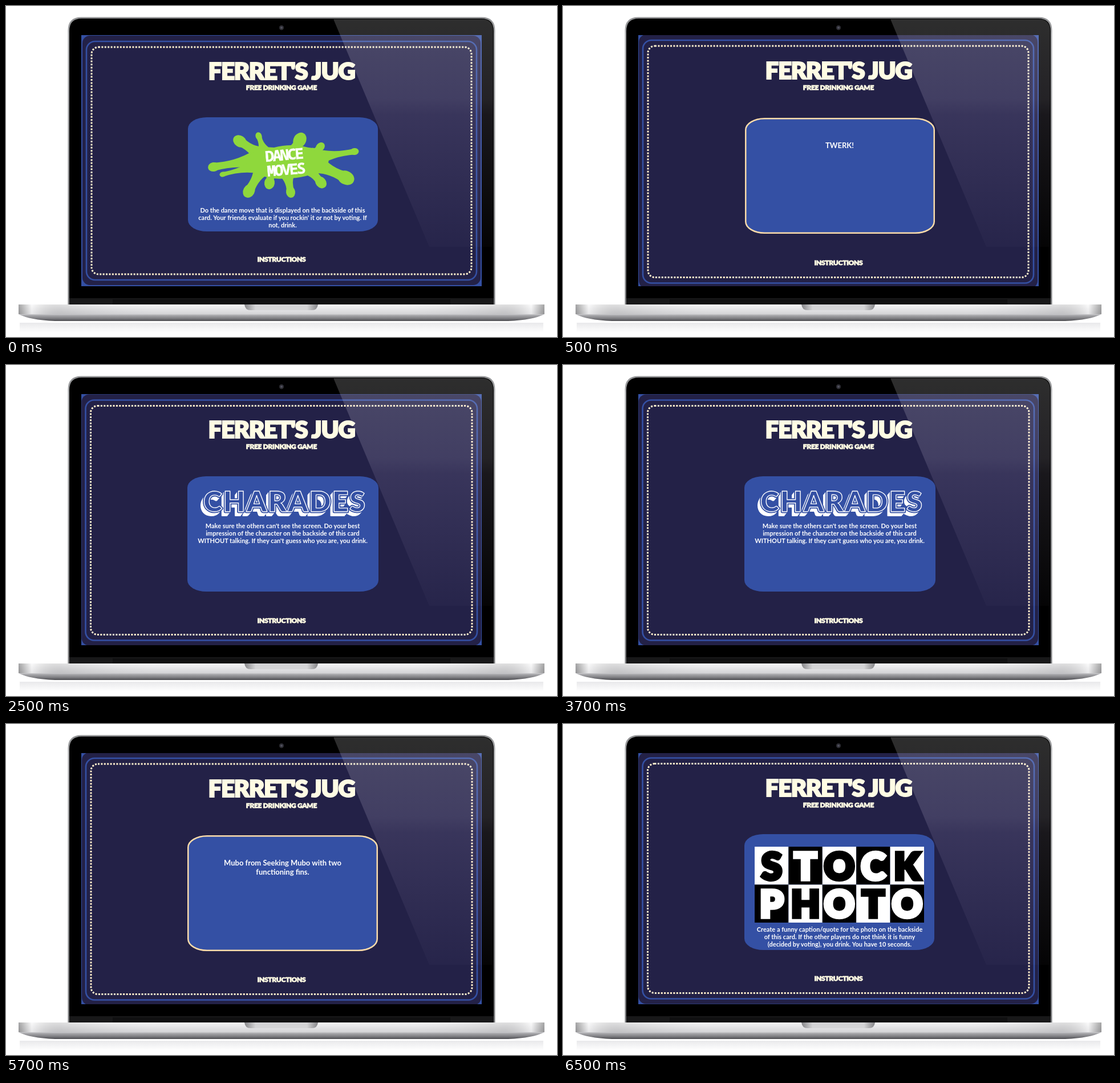
An HTML page that plays this animation: 966 px wide and 580 px high, repeating every 8 s.

```html
<!DOCTYPE html>
<html lang="en">
<head>
<meta charset="utf-8">
<title>Drinking game on a laptop</title>
<style>
  html, body { margin: 0; width: 100%; height: 100%; overflow: hidden; background: #fff; }
  svg { display: block; width: 966px; height: 580px; }
  text { font-family: Lato, Roboto, sans-serif; font-weight: 700; fill: #fff; text-anchor: middle; }
  .bold { font-weight: 900; fill: #fffce4; stroke: #fffce4; }
  .title { font-size: 42px; letter-spacing: -1.4px; stroke-width: 2px; }
  .small { font-size: 12px; letter-spacing: -.3px; stroke-width: .8px; }
  .splat { font: 800 26px "Noto Sans Mono", "DejaVu Sans Mono", monospace; letter-spacing: -2.6px; stroke: #fff; stroke-width: .5px; }
  .shade { font-size: 50px; font-weight: 900; letter-spacing: 2px; text-anchor: start; stroke-linejoin: round; }
  .tile { font-size: 66px; font-weight: 900; stroke-width: 5.5px; }
</style>
</head>
<body>
<svg viewBox="0 0 966 580">
  <defs>
    <linearGradient id="rim" x2="0" y2="1">
      <stop offset="0" stop-color="#8d8e90"/><stop offset=".06" stop-color="#a9aaac"/><stop offset="1" stop-color="#77787a"/>
    </linearGradient>
    <linearGradient id="glare" x2="0" y2="1">
      <stop offset="0" stop-color="#fff" stop-opacity=".18"/>
      <stop offset=".35" stop-color="#f0e6ff" stop-opacity=".15"/>
      <stop offset=".42" stop-color="#e8d8ff" stop-opacity=".11"/>
      <stop offset="1" stop-color="#e8d8ff" stop-opacity=".02"/>
    </linearGradient>
    <linearGradient id="metal" x2="0" y2="1">
      <stop offset="0" stop-color="#f6f6f7"/><stop offset=".25" stop-color="#e4e4e6"/>
      <stop offset=".58" stop-color="#cfcfd2"/><stop offset=".66" stop-color="#a8a8ab"/>
      <stop offset=".85" stop-color="#7c7c80"/><stop offset="1" stop-color="#4c4c50"/>
    </linearGradient>
    <linearGradient id="ends">
      <stop offset="0" stop-color="#555" stop-opacity=".5"/><stop offset=".025" stop-color="#fff" stop-opacity=".5"/>
      <stop offset=".08" stop-color="#888" stop-opacity=".2"/><stop offset=".25" stop-color="#fff" stop-opacity=".1"/>
      <stop offset=".75" stop-color="#fff" stop-opacity=".1"/><stop offset=".92" stop-color="#888" stop-opacity=".2"/>
      <stop offset=".975" stop-color="#fff" stop-opacity=".5"/><stop offset="1" stop-color="#555" stop-opacity=".5"/>
    </linearGradient>
    <linearGradient id="notch">
      <stop offset="0" stop-color="#858588"/><stop offset=".15" stop-color="#d4d4d6"/>
      <stop offset=".85" stop-color="#d4d4d6"/><stop offset="1" stop-color="#858588"/>
    </linearGradient>
    <linearGradient id="floor" x2="0" y2="1">
      <stop offset="0" stop-color="#e9e9eb"/><stop offset="1" stop-color="#fff"/>
    </linearGradient>
    <clipPath id="screen"><rect x="132" y="51" width="702" height="440"/></clipPath>
  </defs>

  <path d="M24 555H942V572H24Z" fill="url(#floor)"/>
  <path d="M108.5 524V43Q108.5 19.5 132 19.5H834Q857.5 19.5 857.5 43V524Z" fill="url(#rim)"/>
  <path d="M111 524V44Q111 22 133 22H833Q855 22 855 44V524Z"/>
  <path d="M111 512H855V523H111Z" fill="#181819"/>
  <path d="M187 514H779V523H187Z" fill="#101011"/>
  <circle cx="483" cy="38" r="4.2" fill="#2b2b31"/>
  <circle cx="483" cy="38" r="2" fill="#50505e"/>

  <g id="scenes" clip-path="url(#screen)"></g>
  <path d="M574 23H833Q854 23 854 44V422H742Z" fill="url(#glare)"/>

  <path d="M22 523H944V540Q925 550 880 552H86Q41 550 22 540Z" fill="url(#metal)"/>
  <path d="M22 523H944V540H22Z" fill="url(#ends)"/>
  <path d="M418 523H547Q546 533 536 533H429Q419 533 418 523Z" fill="url(#notch)"/>
</svg>
<script>
const BLUE = '#3450a4', NAVY = '#232147', CREAM = '#fff0cd', GREEN = '#8fd83c';
const starts = [0, 500, 2500, 4500, 6500], LOOP = 8000;

const text = (x, y, str, attrs = '') => `<text x="${x}" y="${y}" ${attrs}>${str}</text>`;
const lines = (y, step, size, rows) =>
  rows.map((row, i) => text(485, y + i * step, row, `font-size="${size}"`)).join('');
const box = (l, t, r, b, rx, ry, attrs) =>
  `<rect x="${l}" y="${t}" width="${r - l}" height="${b - t}" rx="${rx}" ry="${ry}" ${attrs}/>`;

// One arm of the splat: a tapering neck from the body to a long drop.
function arm(tx, ty, r, bx, by, w) {
  const len = Math.hypot(tx - bx, ty - by), dx = (tx - bx) / len, dy = (ty - by) / len;
  const mx = bx + dx * len * .45, my = by + dy * len * .45;
  const at = (x, y, k) => `${(x - dy * k).toFixed(1)} ${(y + dx * k).toFixed(1)}`;
  const turn = Math.atan2(dy, dx) * 180 / Math.PI;
  return `<path d="M${at(bx, by, w)}Q${at(mx, my, r * .3)} ${at(tx, ty, r * .9)}L${at(tx, ty, -r * .9)}Q${at(mx, my, -r * .3)} ${at(bx, by, -w)}Z"/>
    <ellipse rx="${r * 1.25}" ry="${r}" transform="translate(${tx} ${ty}) rotate(${turn})"/>`;
}

function dance() {
  const arms = [
    [364, 282, 8, 440, 269, 18], [380, 295, 4.5, 440, 280, 14], [410, 237, 10, 446, 261, 17],
    [443, 228, 5.5, 453, 256, 14], [515, 235, 11, 502, 258, 17], [551, 247, 7, 535, 263, 14],
    [611, 255, 6, 540, 266, 18], [596, 301, 12, 545, 277, 18], [552, 309, 9, 530, 283, 17],
    [499, 326, 8, 492, 288, 20], [462, 310, 9, 466, 285, 16], [426, 324, 10, 450, 282, 18]
  ];
  return `<g fill="${GREEN}">${arms.map(a => arm(...a)).join('')}
    <path d="M420 269Q440 244 470 248Q500 240 530 248Q560 250 566 267Q566 286 543 292Q520 302 492 302Q462 305 441 294Q420 286 420 269Z"/></g>
    <g transform="rotate(-5 490 273)">${text(488, 270, 'DANCE', 'class="splat"')}${text(489, 296, 'MOVES', 'class="splat"')}</g>` +
    lines(362, 13, 11, [
      'Do the dance move that is displayed on the backside of this',
      "card. Your friends evaluate if you rockin' it or not by voting. If",
      'not, drink.']);
}

function charades() {
  const face = (x, y, attrs) => text(x, y, 'CHARADES', `class="shade" style="${attrs}"`);
  let out = '';
  for (let i = 7; i > 1; i--) out += face(346 - i * .8, 257 + i, 'stroke:#fff;stroke-width:2px');
  return out + face(346, 257, `stroke:${BLUE};stroke-width:5px`) +
    face(346, 257, `fill:${BLUE};stroke:#fff;stroke-width:1.4px`) +
    lines(286, 13, 11, [
      "Make sure the others can't see the screen. Do your best",
      'impression of the character on the backside of this card',
      "WITHOUT talking. If they can't guess who you are, you drink."]);
}

function stock() {
  const w = 59.4, h = 66.5;
  const tiles = [...'STOCKPHOTO'].map((c, i) => {
    const col = i % 5, row = i / 5 | 0, x = 336 + col * w, y = 215 + row * h;
    const [bg, ink] = (col + row) % 2 ? ['#000', '#fff'] : ['#fff', '#000'];
    return box(x, y, x + w, y + h, 0, 0, `fill="${bg}"`) +
      text(x + w / 2, y + 57.5, c, `class="tile" style="fill:${ink};stroke:${ink}"`);
  });
  return tiles.join('') + lines(364, 13, 11, [
    'Create a funny caption/quote for the photo on the backside',
    'of this card. If the other players do not think it is funny',
    '(decided by voting), you drink. You have 10 seconds.']);
}

// frame: blue border box; ys: baselines of title, subtitle and footer; card: box of the card
const scenes = [
  { frame: [141, 62, 825, 480], ys: [129, 147, 448], card: [319, 195, 652, 395], body: dance() },
  { frame: [140, 60, 825, 485.5], ys: [128, 147, 454], card: [319, 196, 652, 399], back: true,
    body: lines(249, 16, 13, ['TWERK!']) },
  { frame: [139.5, 61.5, 826, 482.5], ys: [128, 147, 451.5], card: [318, 195, 653, 397], body: charades() },
  { frame: [140, 60, 826, 483.5], ys: [127.5, 146.5, 452], card: [318, 195, 652, 398], back: true,
    body: lines(248, 16, 13, ['Mubo from Seeking Mubo with two', 'functioning fins.']) },
  { frame: [139.5, 59.5, 826, 481.5], ys: [127, 145.5, 449.5], card: [318, 193, 651, 396], body: stock() }
];

function draw({ frame: [l, t, r, b], ys, card: [cl, ct, cr, cb], back, body }) {
  const k = back ? 1.25 : 0;
  return `<g><rect x="132" y="51" width="702" height="440" fill="${BLUE}"/>` +
    box(l - 7, t - 10, r + 7, b + 9, 13, 13, `fill="${NAVY}"`) +
    box(l, t, r, b, 15, 15, `fill="none" stroke="${BLUE}" stroke-width="2.6"`) +
    box(l + 9, t + 10, r - 9, b - 10, 12, 12, `fill="none" stroke="${CREAM}" stroke-width="3" stroke-dasharray="3 2.4"`) +
    text(483, ys[0], "FERRET'S JUG", 'class="bold title"') +
    text(483, ys[1], 'FREE DRINKING GAME', 'class="bold small"') +
    text(483, ys[2], 'INSTRUCTIONS', 'class="bold small"') +
    box(cl + k, ct + k, cr - k, cb - k, 33, 20, `fill="${BLUE}"` + (back ? ' stroke="#fbdcaa" stroke-width="2.5"' : '')) +
    body + '</g>';
}

const stage = document.getElementById('scenes');
stage.innerHTML = scenes.map(draw).join('');

function tick() {
  const t = performance.now() % LOOP;
  const now = starts.filter(s => s <= t).length - 1;
  [...stage.children].forEach((g, i) => g.style.display = i === now ? '' : 'none');
  requestAnimationFrame(tick);
}
tick();
</script>
</body>
</html>
```
